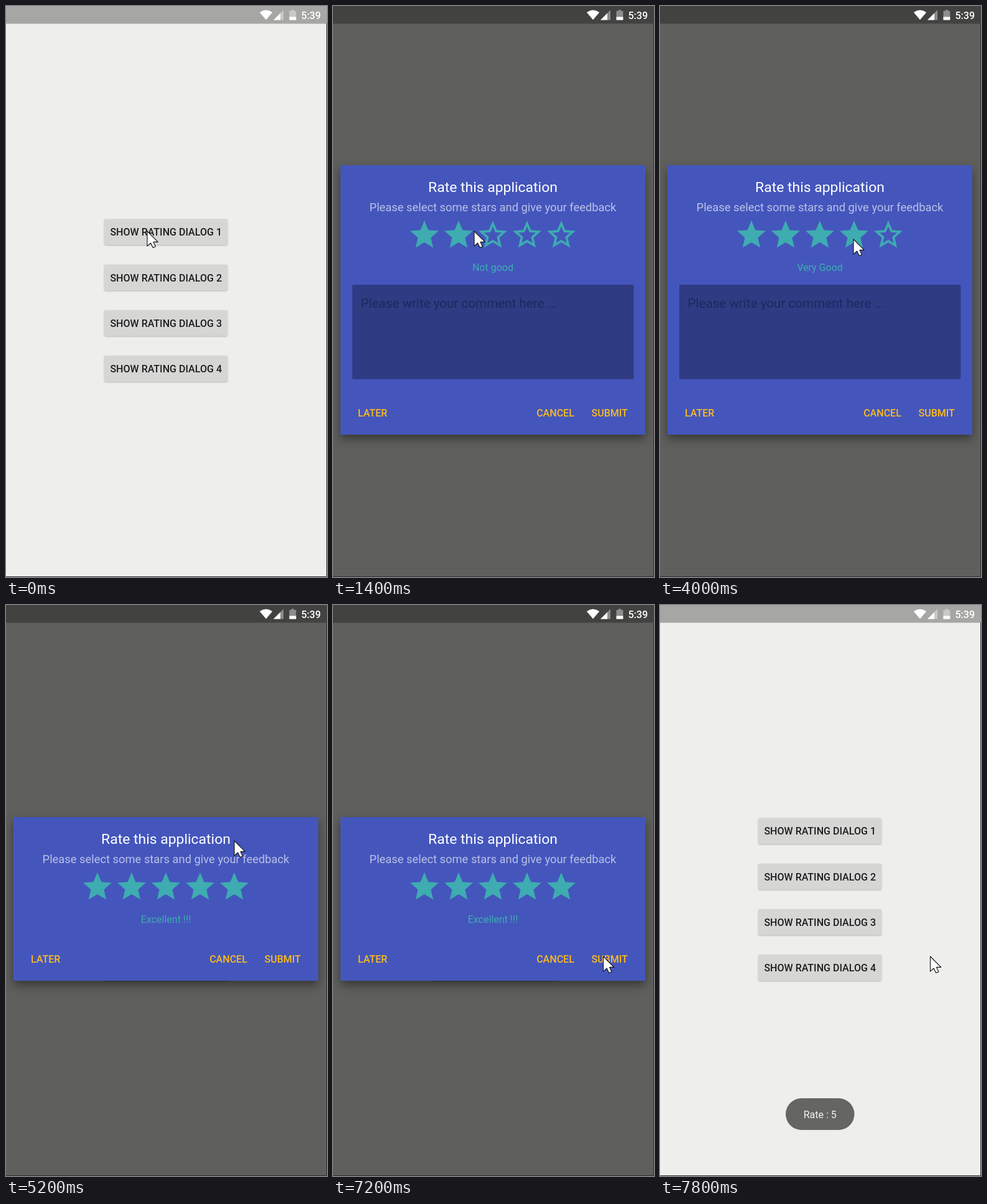
Write an HTML page that moves like this. It is 516 by 918 pixels and loops after 8000 ms.

```html
<!DOCTYPE html>
<html lang="en">
<head>
<meta charset="utf-8">
<title>Rating dialog</title>
<style>
  html, body { margin: 0; width: 100%; height: 100%; overflow: hidden; background: #eeeeec; }
  svg { display: block; width: 516px; height: 918px; }
  text { font: 400 16.05px Roboto, sans-serif; text-anchor: middle; }
  .btn { fill: #d6d7d5; filter: drop-shadow(0 1.2px 1px rgba(40, 40, 60, .3)); }
  .caps { font-weight: 500; fill: #1d1d1d; }
  .action { font-weight: 500; fill: #fcba1e; }
  .card { fill: #4456bc; filter: drop-shadow(0 7px 8px rgba(0, 0, 0, .42)); }
  .teal { fill: #3eacb0; }
</style>
</head>
<body>
<svg viewBox="0 0 516 918">
  <rect width="516" height="918" fill="#eeeeec"/>
  <rect width="516" height="28.5" fill="#a6a6a4"/>
  <g id="buttons"></g>
  <rect id="scrim" width="516" height="918" opacity=".6"/>

  <g id="dialog">
    <rect id="card" class="card" x="12" width="490"/>
    <g id="head">
      <text x="257" y="299" fill="#fff" style="font-size:22.93px">Rate this application</text>
      <text x="257" y="329.5" fill="#b9c0e8" style="font-size:18.35px">Please select some stars and give your feedback</text>
      <g id="stars" class="teal"></g>
      <text id="label" class="teal" x="257" y="425.5"></text>
    </g>
    <g id="comment">
      <rect x="31" y="448" width="452.5" height="152" rx="2" fill="#2f3b83"/>
      <text x="44.5" y="484.5" fill="#1e285e" style="font-size:20.64px;text-anchor:start">Please write your comment here ...</text>
    </g>
    <g id="actions">
      <text class="action" x="63.7" y="660">LATER</text>
      <text class="action" x="357.5" y="660">CANCEL</text>
      <text class="action" x="444.7" y="660">SUBMIT</text>
    </g>
  </g>

  <g id="toast">
    <rect x="202" y="793" width="110.5" height="51" rx="25.5" fill="#656563"/>
    <text x="257.3" y="825" fill="#f4f4f4">Rate : 5</text>
  </g>

  <g fill="#fff">
    <path d="M418 22.3L407.8 10.2Q418 2.8 428.2 10.2Z"/>
    <path d="M430 22.5L446 6.5V22.5Z" opacity=".4"/>
    <path d="M430 22.5L441 11.5V22.5Z"/>
    <path d="M455.5 8H458.6V6.3H463.2V8H466.3V22.5H455.5Z" opacity=".4"/>
    <rect x="455.5" y="17.5" width="10.8" height="5"/>
    <text class="caps" x="490.3" y="21.2" style="fill:#fff">5:39</text>
  </g>
  <path d="M515.5 28V917.5H0" fill="none" stroke="#2c2c2c"/>
  <path id="cursor" d="M0 0V24.2L5.6 19L9.2 26.6L13.4 24.8L10 17.4H17.2Z"
        fill="#fff" stroke="#111" stroke-width="1.1" stroke-linejoin="round"/>
</svg>

<script>
const LOOP = 8000, STEP = 200;
const OPEN = 1400, COLLAPSE = 5200, CLOSE = 7400;
const FULL = "M12 17.27L18.18 21l-1.64-7.03L22 9.24l-7.19-.61L12 2 9.19 8.63 2 9.24l5.46 4.73L5.82 21z";
const HOLE = "M12 15.4l-3.76 2.27 1-4.28-3.32-2.88 4.38-.38L12 6.1l1.71 4.04 4.38.38-3.32 2.88 1 4.28z";

// time, x, y of the pointer tip
const path = [
  [0, 227, 362], [2000, 227, 362], [2600, 259, 370], [3200, 259, 370],
  [3800, 311, 375], [4400, 311, 375], [5000, 367, 379], [6000, 367, 379],
  [7000, 434.5, 565], [LOOP, 434.5, 565]
];
// time, stars lit, caption
const ratings = [
  [OPEN, 2, "Not good"], [2600, 3, "Quite ok"],
  [3800, 4, "Very Good"], [COLLAPSE, 5, "Excellent !!!"]
];

const $ = id => document.getElementById(id);
const show = (el, on) => el.setAttribute("display", on ? "inline" : "none");
const shift = (el, x, y) => el.setAttribute("transform", `translate(${x} ${y})`);
const clamp = v => Math.max(0, Math.min(1, v));
const ease = v => v * v * (3 - 2 * v);

$("buttons").innerHTML = [0, 1, 2, 3].map(i => {
  const y = 342.4 + i * 73.3;
  return `<rect class="btn" x="158" y="${y}" width="198" height="41.6" rx="2.3"/>
    <text class="caps" x="257.2" y="${y + 26.8}">SHOW RATING DIALOG ${i + 1}</text>`;
}).join("");
$("stars").innerHTML = [0, 1, 2, 3, 4].map(i =>
  `<path fill-rule="evenodd" transform="translate(${119.4 + i * 55} 340.4) scale(2.294)"/>`).join("");

const stars = [...$("stars").children];
const first = $("buttons").firstElementChild;

function pointer(t) {
  const i = path.findIndex(p => p[0] > t);
  const [t0, x0, y0] = path[i - 1], [t1, x1, y1] = path[i];
  const k = ease((t - t0) / (t1 - t0));
  return [x0 + (x1 - x0) * k, y0 + (y1 - y0) * k];
}

function press(t) {
  const k = t < OPEN ? clamp(t / 400) : 0;
  first.setAttribute("x", 158 - .6 * k);
  first.setAttribute("width", 198 + 1.2 * k);
  first.style.filter =
    `drop-shadow(0 ${1.2 + 1.6 * k}px ${1 + k}px rgba(40,40,60,${.3 + .08 * k}))`;
}

function drawDialog(t) {
  const open = t >= OPEN && t < CLOSE;
  show($("scrim"), open);
  show($("dialog"), open);
  if (!open) return;
  const [, lit, caption] = ratings.filter(r => r[0] <= t).pop();
  const inset = t >= COLLAPSE ? 85 : 0;
  stars.forEach((s, i) => s.setAttribute("d", i < lit ? FULL : FULL + HOLE));
  $("label").textContent = caption;
  $("card").setAttribute("y", 256 + inset);
  $("card").setAttribute("height", 433 - 2 * inset);
  shift($("head"), 0, inset);
  shift($("actions"), 0, -inset);
  show($("comment"), !inset);
}

function draw(now) {
  const t = Math.floor(now % LOOP / STEP) * STEP;
  press(t);
  drawDialog(t);
  $("toast").setAttribute("opacity", clamp((t - CLOSE) / 350));
  shift($("cursor"), ...pointer(t));
}

const start = performance.now();
function tick() {
  draw(performance.now() - start);
  requestAnimationFrame(tick);
}
tick();
</script>
</body>
</html>
```
